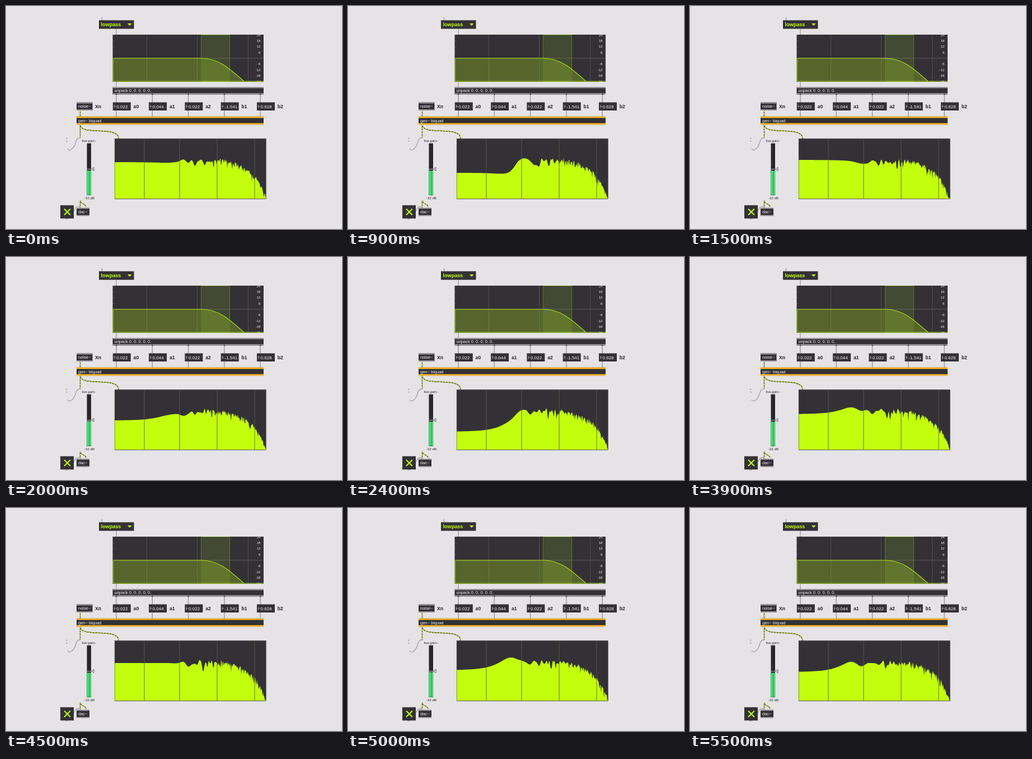
Recreate the animation shown at these times as an HTML page with a canvas. Size 600 by 397 pixels, loop 5600 ms.

```html
<!DOCTYPE html>
<html lang="en">
<head>
<meta charset="utf-8">
<title>Biquad patch</title>
<style>
  html, body { margin: 0; width: 100%; height: 100%; overflow: hidden; background: #e5e3e5; }
  canvas { display: block; width: 600px; height: 397px; }
</style>
</head>
<body>
<canvas id="stage"></canvas>
<script>
const canvas = document.getElementById('stage');
const ratio = window.devicePixelRatio || 1;
canvas.width = 600 * ratio;
canvas.height = 397 * ratio;
const ctx = canvas.getContext('2d');
ctx.scale(ratio, ratio);

const STEP = 100, STEPS = 56;
const DARK = '#333135', LIME = '#c3ff0d', GREY = '#969496', INK = '#242326';

function rect(x, y, w, h, color) {
  ctx.fillStyle = color;
  ctx.fillRect(x, y, w, h);
}

function text(str, x, y, size, color = '#f0f0f0', weight = '', align = 'left') {
  ctx.font = `${weight} ${size}px "Liberation Sans", Arial, sans-serif`;
  ctx.textAlign = align;
  ctx.fillStyle = color;
  ctx.fillText(str, x, y);
}

function stroke(path, color, width = 1, dash = []) {
  ctx.strokeStyle = color;
  ctx.lineWidth = width;
  ctx.setLineDash(dash);
  ctx.stroke(new Path2D(path));
  ctx.setLineDash([]);
}

function fill(path, color) {
  ctx.fillStyle = color;
  ctx.fill(new Path2D(path));
}

function signalCable(path) {
  stroke(path, '#46521f', 1.4);
  stroke(path, '#b9d82f', 1.4, [2.5, 2.5]);
}

function objectBox(label, x, y, w, h, bar, barHeight) {
  rect(x, y, w, h, DARK);
  rect(x, y, w, barHeight, bar);
  rect(x, y + h - barHeight, w, barHeight, bar);
  text(label, x + 3, y + h / 2 + 2.7, 7.5);
}

function drawFilterGraph() {
  ctx.save();
  ctx.beginPath();
  ctx.rect(190.5, 51, 269.5, 84);
  ctx.clip();
  rect(190, 51, 270, 84, DARK);
  for (const x of [251, 341, 432]) rect(x, 51, 1, 84, '#504e51');
  rect(191, 92.5, 269, 1, '#5b5a5c');

  const response = 'M191 93H349C379 93 398 110 425 134';
  fill(response + 'H191Z', 'rgba(180,235,28,.28)');
  rect(348.5, 51, 51, 84, 'rgba(150,200,40,.16)');
  stroke('M348.5 51.5H399.5V134H348.5Z', '#5f7a20');
  stroke(response + 'H460M191 93V134H425', '#a9dc18', 1.2);

  for (let db = 24, y = 51.5; db >= -24; db -= 6, y += 10.35) {
    rect(191, y, 2.5, .7, '#666468');
    if (db) text(db, 454.5, y + 2.2, 6.1, '#f0f0f0', '', 'right');
  }
  ctx.restore();
}

function drawPatch() {
  rect(0, 0, 600, 397, '#e5e3e5');

  stroke('M171.5 20V25M197 41V51M197 135V144', GREY, 1.2);
  rect(166, 25.4, 62.5, 15.2, DARK);
  text('lowpass', 169.5, 36, 9.1, LIME, 'bold');
  fill('M217 31H224.5L220.8 35.3Z', LIME);
  drawFilterGraph();

  objectBox('unpack 0. 0. 0. 0. 0.', 190.5, 144, 269.5, 13.5, '#99979a', 2.3);
  objectBox('noise~', 126, 171.5, 28.5, 14.5, '#99979a', 2);
  text('Xn', 159, 181.6, 8.7, INK, 'bold');

  const coefficients = { a0: '0.022', a1: '0.044', a2: '0.022', b1: '-1.541', b2: '0.628' };
  Object.entries(coefficients).forEach(([name, value], i) => {
    const x = 190.8 + i * 64.3;
    stroke(`M${x + 6.2} 157.5V197`, GREY, 1.4);
    rect(x + 5, 156.3, 2.5, 1.8, '#3a383b');
    rect(x, 171.5, 32, 14.5, DARK);
    fill(`M${x + 2} 175.5L${x + 5.5} 178.8L${x + 2} 182Z`, '#807e81');
    text(value, x + 6.5, 181.6, 8.1);
    text(name, x + 36.8, 181.6, 8.7, INK, 'bold');
  });

  objectBox('gen~ biquad', 126, 196.7, 334, 14.5, '#ffb820', 2.6);
  signalCable('M132.5 186V197');
  signalCable('M132.5 211V235');
  signalCable('M132.5 211C132.5 232 201 212 201 236');

  stroke('M110 254C113 260 121 254 124 244C126 236 130 234 133 235', '#a9a7aa', 1.5);
  rect(107, 234.5, 2.5, 2, '#b0aeb1');
  rect(107.5, 239.5, 2.5, 2, '#b0aeb1');
  text('live.gain~', 135.5, 241.8, 6.1, INK);
  text('-32 dB', 140, 344, 6.1, INK);

  stroke('M106 379C112 381 118 371 122 363C125 357 129 356 133 358', '#a9a7aa', 1.4);
  rect(97, 354.7, 24, 23.6, DARK);
  stroke('M104 361.2L114.8 372M114.8 361.2L104 372', LIME, 2);
  objectBox('dac~', 126, 359, 23, 15, '#99979a', 2);
  signalCable('M132.5 346V359');
  signalCable('M132.5 346C134 355 142 350 143 358');
}

function randomFrom(seed) {
  let state = seed * 7919;
  return () => {
    state = state + 0x6d2b79f5 | 0;
    let hash = Math.imul(state ^ state >>> 15, 1 | state);
    hash ^= hash + Math.imul(hash ^ hash >>> 7, 61 | hash);
    return ((hash ^ hash >>> 14) >>> 0) / 4294967296;
  };
}

// Step, height at zero frequency, height of the first bin.
const levelKeys = [
  [0, 278, 279], [9, 297, 297], [15, 274, 276], [24, 311, 294],
  [32, 269, 268], [45, 276, 276], [55, 292, 274]
];

function lowLevels(step, random) {
  const next = Math.max(1, levelKeys.findIndex(key => key[0] >= step));
  const from = levelKeys[next - 1], to = levelKeys[next];
  const u = (step - from[0]) / (to[0] - from[0]);
  return [1, 2].map(i =>
    from[i] + (to[i] - from[i]) * u + 18 * Math.sin(Math.PI * u) * (random() - .5));
}

// The frequency axis is logarithmic: 67 pixels per decade, first bin at x = 285.
const binAt = x => 10 ** ((x - 285) / 67);
const xOfBin = bin => 285 + 67 * Math.log10(bin);

function rolloff(x) {
  const u = Math.max(0, (x - 384) / 80);
  return 275 + 30 * u ** 1.4 + 37 * u ** 5;
}

function binHeights(step) {
  const random = randomFrom(step + 1);
  const heights = lowLevels(step, random);
  while (heights.length < 475) {
    const power = -Math.log(1 - random() * .99 - .005);
    heights.push(Math.min(342, rolloff(xOfBin(heights.length)) - 3.4 * Math.log(power)));
  }
  return heights;
}

function cubicAt(values, position) {
  const i = Math.floor(position), t = position - i;
  const b = values[i], c = values[i + 1], d = values[i + 2];
  const a = values[Math.max(0, i - 1)];
  return b + t / 2 * (c - a + t * (2 * a - 5 * b + 4 * c - d + t * (3 * (b - c) + d - a)));
}

function drawSpectrum(step) {
  rect(194, 236, 270.5, 107.5, DARK);
  rect(194, 237.5, 270, .7, '#4b494d');
  const heights = binHeights(step);
  ctx.beginPath();
  ctx.moveTo(194, 343);
  for (let x = 194; x <= 464; x++) ctx.lineTo(x, Math.min(343, cubicAt(heights, binAt(x))));
  ctx.lineTo(464, 343);
  ctx.fillStyle = LIME;
  ctx.fill();
  for (const x of [246.5, 309.5, 376.5, 443.5]) rect(x, 236, 1, 107, 'rgba(88,92,80,.85)');
  stroke('M194.3 236.3H464.2V343.3H194.3Z', '#4c4b4a', .6);
}

function drawMeter(step) {
  const top = 293 + Math.sin(step * 2.1) * .7;
  rect(144.5, 244.5, 7.5, 92.5, '#29272b');
  for (const x of [145, 148.6]) {
    rect(x, top, 3, 336.5 - top, '#1fe45c');
    rect(x + 1, top, 1.3, 336.5 - top, '#5cff92');
  }
  rect(144.5, 290, 7.5, 1, '#b5b5b5');
  stroke('M157 287.3L152.5 290.3L157 293.3Z', '#555356', .9);
}

function render(now) {
  const step = Math.floor(now / STEP) % STEPS;
  drawPatch();
  drawMeter(step);
  drawSpectrum(step);
}

const start = performance.now();
function tick() {
  render(performance.now() - start);
  requestAnimationFrame(tick);
}
tick();
</script>
</body>
</html>
```
